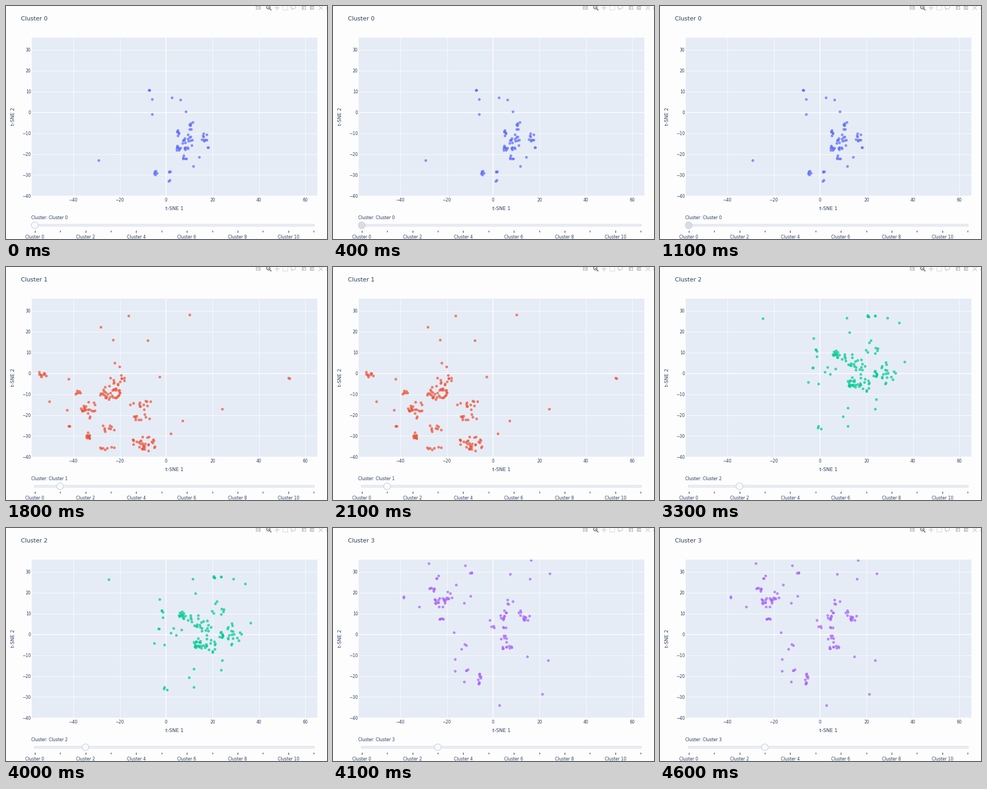
These frames come from a looping animation (600 by 435 pixels, 5000 ms). A matplotlib script:

```python
import numpy as np
import matplotlib.pyplot as plt
from matplotlib.animation import FuncAnimation
from matplotlib.patches import Circle, FancyBboxPatch, Rectangle

W, H, DPI = 600, 435, 120
STEP_MS, LOOP_MS = 100, 5000
INK, RAIL, GRIP, GRIP_DOWN = "#2a3f5f", "#bec8d9", "#f8fafc", "#dbdde3"
ICON, ICON_ON = "#c9c9cb", "#7d7d80"
LEFT, TOP, RIGHT, BOTTOM = 47.5, 59, 581.5, 354.8
GRIP_X0, GRIP_GAP, GRIP_Y = 53.7, 47.4, 409.4

plt.rcParams["font.family"] = "DejaVu Sans"
fig = plt.figure(figsize=(W / DPI, H / DPI), dpi=DPI, facecolor="#fdfdfe")
ax = fig.add_axes([0, 0, 1, 1])
ax.set(xlim=(0, W), ylim=(H, 0))
ax.axis("off")


def pt(px):
    return px * 72 / DPI


def label(x, y, text, px=7.75, ha="center", va="center_baseline", **kw):
    return ax.text(x, y, text, fontsize=pt(px), color=INK, ha=ha, va=va, **kw)


def line(xs, ys, color=ICON, px=1.2, **kw):
    ax.plot(xs, ys, color=color, lw=pt(px), zorder=2,
            solid_capstyle="butt", **kw)


def sx(v):
    return 299.3 + 4.335 * v


def sy(v):
    return 198.6 - 3.895 * v


def cloud(seed, color, singles, groups):
    """Single dots plus seeded elliptic groups (x, y, rx, ry, count)."""
    rng = np.random.default_rng(seed)
    parts = [np.array(singles, float)]
    for x, y, rx, ry, n in groups:
        r, a = np.sqrt(rng.random(n)), rng.uniform(0, 2 * np.pi, n)
        parts.append(np.column_stack([x + rx * r * np.cos(a),
                                      y + ry * r * np.sin(a)]))
    return color, np.vstack(parts)


blue = cloud(
    3, "#636efa",
    [(172.5, 288), (272.5, 174), (273, 201.5), (310, 171), (325.5, 175),
     (335.5, 197), (350, 299), (360.5, 282)],
    [(268, 157, 1, 1, 3), (280, 312, 5, 5, 6), (305, 309, 3, 2, 3),
     (306, 327, 2, 2, 2), (345, 224, 9, 8, 7), (371, 245, 7, 8, 9),
     (321, 239, 2, 8, 7), (322, 266, 7, 6, 9), (340, 254, 12, 16, 20),
     (334, 283, 5, 6, 5), (377, 264, 2, 1, 2)])

red = cloud(
    5, "#ef553b",
    [(228.5, 91), (343, 89), (177, 112), (200, 136), (265, 137),
     (202.5, 179), (212, 185.5), (287, 204.5), (403.5, 264.5),
     (330, 287), (308, 311), (80.5, 250.5), (114, 267), (117, 208.5)],
    [(531, 207, 3, 1, 2), (67, 201, 11, 6, 9), (134, 235, 5, 5, 6),
     (208, 211, 15, 13, 12), (195, 235, 20, 13, 34), (156, 267, 17, 17, 22),
     (117, 297, 3, 0, 3), (154, 315, 6, 6, 14), (192, 301, 16, 7, 9),
     (188, 334, 16, 7, 7), (251, 255, 20, 13, 12), (253, 281, 19, 7, 10),
     (257, 330, 24, 15, 32)])

green = cloud(
    8, "#00cc96",
    [(192, 96), (349, 95), (424.5, 95), (447, 103.5), (354, 121.5),
     (287, 133), (457, 176.5), (277, 215), (295.5, 217.5), (351, 263),
     (342, 278.5), (350.5, 297), (403.5, 247), (402, 264.5)],
    [(389, 89, 1, 8, 5), (402, 91, 2, 1, 2), (292, 160, 2, 11, 4),
     (285, 188, 2, 1, 2), (300, 299, 8, 4, 3), (332, 163, 10, 7, 13),
     (350, 171, 18, 18, 11), (318, 192, 12, 14, 4), (371, 186, 12, 16, 13),
     (396, 150, 14, 14, 8), (356, 214, 8, 10, 16), (379, 220, 15, 14, 17),
     (404, 202, 6, 9, 9), (420, 196, 7, 24, 14), (437, 202, 7, 9, 4)])

purple = cloud(
    13, "#ab63fa",
    [(179, 66), (247, 69.5), (330.5, 85.5), (370, 60), (404.5, 85),
     (368, 94.5), (229.5, 105.5), (256.5, 126.5), (245, 139.5),
     (161, 146.5), (226, 195), (228, 245), (228, 267), (245, 287),
     (402, 247), (390.5, 310), (310.5, 331), (363, 239.5)],
    [(132, 129, 1, 1, 2), (255, 84, 5, 1, 3), (195, 93, 5, 5, 3),
     (184, 114, 6, 6, 7), (199, 137, 12, 12, 17), (217, 128, 6, 11, 7),
     (202, 170, 4, 4, 5), (250, 224, 12, 9, 3), (256, 265, 8, 5, 3),
     (274, 282, 4, 11, 10), (330, 139, 8, 9, 4), (319, 163, 6, 12, 10),
     (293, 182, 13, 11, 4), (320, 186, 4, 1, 3), (362, 168, 8, 5, 9),
     (350, 154, 4, 9, 4), (319, 213, 7, 14, 11), (333, 219, 5, 9, 4)])

CLUSTERS = [blue, red, green, purple]


def minus(v):
    return str(v).replace("-", "\u2212")


def draw_plot():
    panel = Rectangle((LEFT, TOP), RIGHT - LEFT, BOTTOM - TOP,
                      fc="#e5ecf6", lw=0, zorder=1)
    ax.add_patch(panel)
    for v in range(-40, 61, 20):
        line([sx(v)] * 2, [TOP, BOTTOM], "white", 0.8 if v else 1.5)
        label(sx(v), 361.5, minus(v))
    for v in range(-40, 31, 10):
        line([LEFT, RIGHT], [sy(v)] * 2, "white", 0.8 if v else 1.5)
        label(46.5, sy(v), minus(v), ha="right")
    label(314.5, 377.8, "t-SNE 1", 9.1)
    label(13.2, 206.5, "t-SNE 2", 9.1, rotation=90, va="center")
    return panel


def draw_slider():
    ax.add_patch(FancyBboxPatch(
        (53, 407.9), 523.2, 3, boxstyle="round,pad=0,rounding_size=1.4",
        fc=GRIP, ec=RAIL, lw=pt(0.8), zorder=3))
    for i in range(12):
        x = GRIP_X0 + GRIP_GAP * i
        line([x, x], [419, 421.6 if i % 2 else 423.4], "#333333", 1.1)
        if i % 2 == 0:
            label(x, 431, f"Cluster {i}")


def draw_toolbar():
    def box(x, y, w, h):
        ax.add_patch(Rectangle((x, y), w, h, fc=ICON, lw=0))

    def ring(x, y, r, fill, edge, px):
        ax.add_patch(Circle((x, y), r, fc=fill, ec=edge, lw=pt(px)))

    # camera, magnifier, pan cross
    box(466.5, 0, 9, 7)
    ring(471, 3.6, 1.9, ICON, "white", 1)
    ring(490.3, 2.3, 3.2, "none", ICON_ON, 1.5)
    line([492.6, 496], [4.6, 8], ICON_ON, 1.9)
    ax.plot(490.3, 2.3, "+", color=ICON_ON, ms=pt(3), mew=pt(0.9))
    ax.plot(506.2, 3, "+", color=ICON, ms=pt(9), mew=pt(1.2))
    # dashed selection and lasso
    ax.add_patch(Rectangle((517, -1.5), 9, 8.5, fc="none", ec=ICON,
                           lw=pt(1.2), ls=(0, (1.6, 1.2))))
    t = np.linspace(0.75, 2.55, 40) * np.pi
    line(537 + 4.4 * np.cos(t), 2 - 3.4 * np.sin(t))
    line([533.6, 535, 534], [4.4, 5.6, 7.6])
    # zoom buttons, autoscale, home
    for x, mark in ((557, "+"), (572, "_")):
        box(x - 4.4, -1.4, 8.8, 8.8)
        ax.plot(x, 3, marker=mark, color="white", ms=pt(5), mew=pt(1.3))
    ax.plot(587.5, 3, "x", color=ICON, ms=pt(8), mew=pt(1.1))
    box(598.5, 2, 3, 5.4)


panel = draw_plot()
draw_slider()
draw_toolbar()
dots = ax.scatter([], [], s=pt(5.1) ** 2, alpha=0.72, lw=0, zorder=4)
dots.set_clip_path(panel)
title = label(28.3, 23.3, "", 10.95, ha="left")
current = label(47.3, 394.9, "", 7.85, ha="left")
grip = Circle((GRIP_X0, GRIP_Y), 6.3, ec=RAIL, lw=pt(0.9), zorder=5)
ax.add_patch(grip)


def update(i):
    ms = i * STEP_MS
    k = sum(ms >= start for start in (1800, 3000, 4100))
    color, xy = CLUSTERS[k]
    dots.set_offsets(xy)
    dots.set_facecolor(color)
    title.set_text(f"Cluster {k}")
    current.set_text(f"Cluster: Cluster {k}")
    grip.center = GRIP_X0 + GRIP_GAP * k, GRIP_Y
    grip.set_facecolor(GRIP_DOWN if 100 <= ms < 1800 else GRIP)
    return dots, title, current, grip


anim = FuncAnimation(fig, update, frames=LOOP_MS // STEP_MS,
                     interval=STEP_MS, repeat=True, repeat_delay=0)
plt.show()
```
